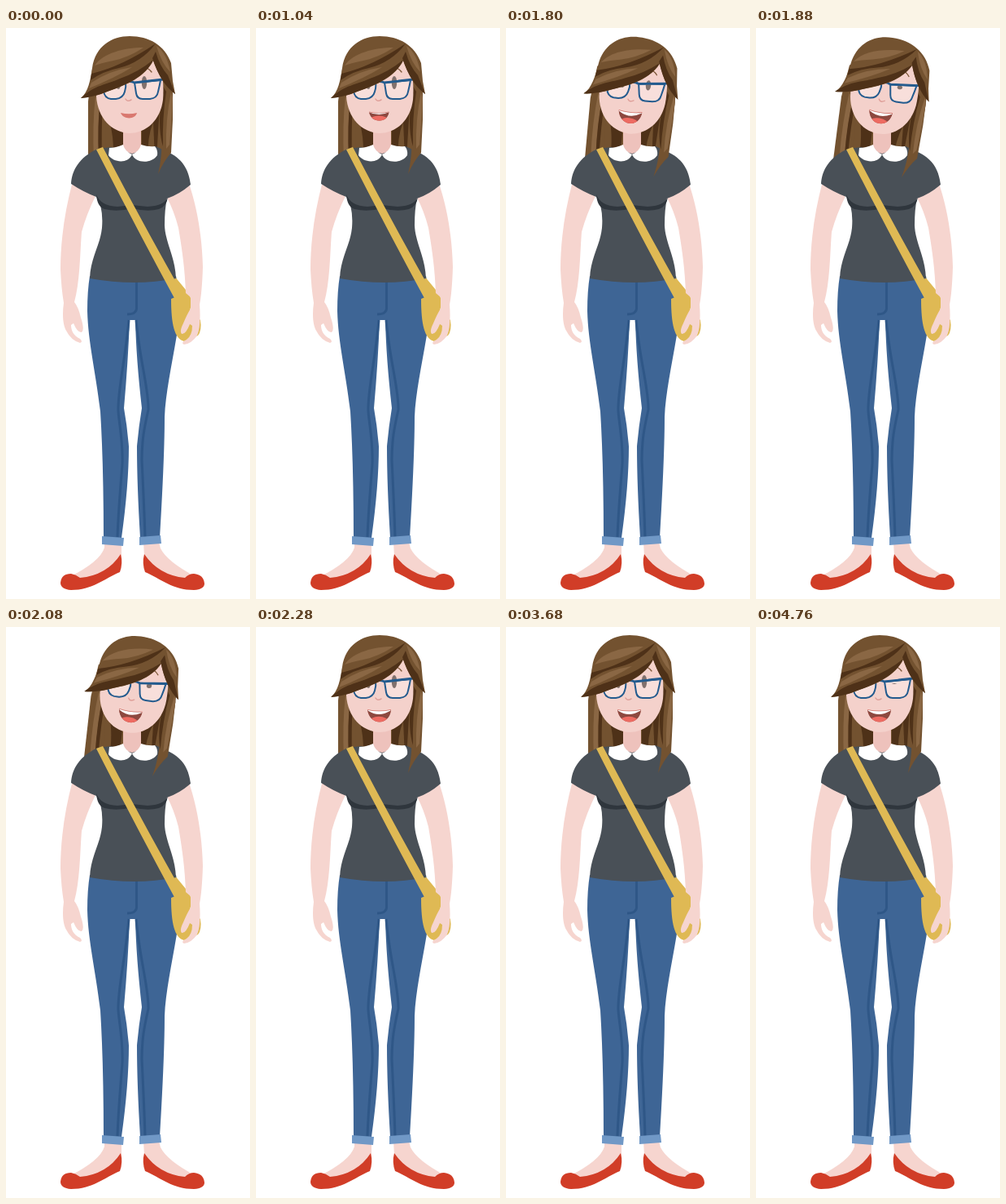
Recreate the animation shown at these times as an HTML page. Size 300 px wide and 700 px high, loop 4.8 s.

```html
<!DOCTYPE html>
<html lang="en">
<head>
<meta charset="utf-8">
<title>Smiling woman</title>
<style>
html, body { margin: 0; width: 100%; height: 100%; overflow: hidden; background: #fff; }
svg { display: block; width: 100%; height: 100%; }
.skin { fill: #f6d5cf; } .face { fill: #f4d1cb; } .neck { fill: #eec2bc; }
.shirt { fill: #495057; } .shade { fill: #2f363d; }
.jeans { fill: #3e6595; } .seam { fill: none; stroke: #2f5787; stroke-width: 3; }
.cuff { fill: #7098c6; } .shoe { fill: #d13d27; } .bag { fill: #dfb954; }
.hair { fill: #735230; } .dark { fill: #4e3118; } .light { fill: #8a6744; }
.frame { fill: #f8dfdb; stroke: #235b8e; stroke-width: 2; }
.line { fill: none; stroke-linecap: round; }
</style>
</head>
<body>
<svg viewBox="0 0 300 700">
  <g class="swing">
    <path class="hair" d="M106 50L198 50 205 85 204 120 201 168 101 168 101 90Z"/>
    <path class="dark" d="M118 80L190 80 185 160 167 160 167 126 144 126 144 160 130 160 124 118Z"/>
    <path class="light" d="M110 84Q106 118 108 162L114 162Q113 120 115 90Z"/>
    <path class="dark" d="M116 88Q112 118 114 160L118 160Q117 122 119 94Z"/>
    <path class="hair" d="M122 100Q133 125 132 158L123 158Z"/>
    <path class="hair" d="M181 115Q173 135 175 160L183 160Z"/>
  </g>

  <!-- legs and feet -->
  <path class="skin" d="M121 630H142V650Q125 672 96 677L78 673Q116 654 121 637Z"/>
  <path class="skin" d="M169 630H188L190 638Q198 654 232 672L215 677Q186 672 170 648Z"/>
  <path class="shoe" d="M67 680Q68 669 80 669Q86 670 91 674Q124 671 141 645Q144 656 140 667C121 675 106 689 80 689Q67 688 67 680Z"/>
  <path class="shoe" d="M244 681Q243 670 231 669Q225 669 220 674Q188 671 170 645Q167 656 171 667C190 675 205 689 231 689Q244 688 244 681Z"/>
  <path class="jeans" d="M103 304H209Q217 342 209 382C204 412 196 449 195 477Q195 525 189 625H165Q161 560 161 513Q163 490 167 466Q160 405 159 358H152Q150 410 145 466Q149 488 151 513Q151 560 142 625H120Q120 535 116 470C110 420 101 385 100 347Q100 322 103 304Z"/>
  <path class="seam" d="M151 358C147 405 137 445 138 470C140 492 144 508 143 535Q138 595 137 624M160 358C164 405 176 445 175 468C170 490 167 505 167 530Q170 590 171 624M160.500 311V344Q160 351 149 351"/>
  <path class="cuff" d="M118 623L145 625 144 635 118 633ZM164 624L190 622 191 632 164 634Z"/>

  <!-- arms and torso -->
  <path class="bag" d="M207 304L226 327Q229 337 226 347L239 358Q241 371 236 377L219 384C207 381 203 363 203 332L208 330Z"/>
  <path class="skin" d="M82 188C72 225 67 262 67 296Q68 319 71 337C69 351 70 364 74 371Q80 383 91 386Q95 385 91 381C83 377 80 371 80 364L83 362Q88 374 93 373Q97 370 92 355Q89 342 84 336C91 311 91 276 93 250Q99 228 111 204Z"/>
  <path class="skin" d="M224 188C236 222 241 258 242 293Q241 324 238 339Q240 365 235 377Q228 387 219 388Q214 386 222 382Q229 377 229 365L226 363Q221 376 216 375Q213 372 218 362Q223 350 227 344V330L221 325C220 292 215 263 212 245Q207 225 197 206Z"/>
  <path class="neck" d="M144 118H166V143Q172 149 180 147L155 157 130 147Q144 149 144 143Z"/>
  <path class="shirt" d="M113 148L129 146 155 154 184 145 201 153C219 162 225 176 227 192Q213 204 198 209Q195 222 195 242C196 264 208 280 209 307Q159 317 103 307C104 281 116 266 118 245Q120 220 111 207Q95 201 80 191C81 175 89 159 113 148Z"/>
  <path class="shade" d="M111 204Q116 218 137 219L155 217 174 219Q194 218 199 208Q197 219 188 222Q174 226 155 221Q137 226 121 222Q112 219 111 204Z"/>
  <path fill="#fff" d="M127 147Q135 147 144 143Q146 151 155 155Q164 151 166 143Q175 146 183 145Q187 150 186 156C179 167 159 166 155 155C150 167 132 165 126 156Z"/>
  <path class="bag" d="M111 149L119 146Q165 234 215 322L208 333Q159 243 111 149Z"/>

  <g class="swing">
    <path class="hair" d="M187 58L205 72 205 112 203 153Q194 163 187 179C194 151 191 126 192 83Z"/>
    <path class="dark" d="M192 70L197 78Q192 110 193 145Q187 126 190 95Z"/>
    <path class="light" d="M203 78Q196 112 197 148L201 143Q204 110 205 86Z"/>
  </g>

  <g id="head">
    <path class="face" d="M111 50L150 30H188Q195 65 193 88C190 113 172 129 152 129C130 128 113 111 111 84Z"/>
    <path class="line" d="M167 49Q174 47 179 54" stroke="#7c5738" stroke-width="1.300"/>
    <path class="line" d="M147 87Q149 91 154 88" stroke="#dfa09a" stroke-width="1.500"/>
    <path class="frame" d="M118 72L147 67Q148 72 146 78Q144 86 135 87H129Q121 86 120 77ZM158 67L190 64Q189 70 187 78Q186 86 177 87H168Q161 87 160 80Z"/>
    <g fill="#81716d">
      <ellipse class="eye" cx="138.200" cy="67" rx="3.200"/>
      <ellipse class="eye" cx="170" cy="67" rx="3.200"/>
    </g>
    <path class="line" d="M120 71L146 67Q152 64 158 67L193 63" stroke="#235b8e" stroke-width="2.800"/>

    <clipPath id="lips"><path id="lipShape"/></clipPath>
    <path id="mouth" fill="#d9786f"/>
    <g id="inside" clip-path="url(#lips)">
      <path fill="#8d4940" d="M136 98H168V118H136Z"/>
      <ellipse id="tongue" fill="#ed6b62" cx="151" rx="12" ry="6.500"/>
      <path id="teeth" fill="#fff"/>
    </g>

    <path class="hair" d="M92 86C101 79 104 63 106 49C110 22 130 10 152 10C176 10 195 21 203 43L205 65 208 81Q191 68 181 40C171 60 148 70 127 77Q108 85 92 86Z"/>
    <path class="dark" d="M92 86C108 70 125 69 140 62Q163 54 181 39C172 59 149 69 127 77Q108 85 92 86Z"/>
    <path class="dark" d="M105 56Q143 47 184 19Q167 42 139 49Q119 53 104 64Z"/>
    <path class="light" d="M109 46C119 31 145 24 169 24Q151 36 132 40Q117 43 109 46Z"/>
    <path class="light" d="M105 67Q127 52 155 48Q134 61 102 74Z"/>
    <path class="dark" d="M180 37L184 29Q189 47 199 58L208 81Q190 68 180 37Z"/>
    <path class="light" d="M185 22Q198 31 202 54Q191 43 185 22Z"/>
  </g>
</svg>
<script>
const LOOP = 4800, STEP = 40;
const $ = id => document.getElementById(id);
const all = name => document.querySelectorAll("." + name);
const clamp = v => Math.max(0, Math.min(1, v));
const mix = (a, b, k) => a + (b - a) * k;

// Eyelids close in four steps, rest, then open in three.
const blink = (t, start) =>
  Math.min(clamp((t - start + STEP) / 160), 1 - clamp((t - start - 240) / 120));

function mouthPath(k) {
  const l = mix(141, 137, k), r = mix(161, 166, k), y = mix(104, 101, k);
  const sag = mix(106.5, 104, k), low = mix(112.5, 120.5, k);
  return `M${l} ${y}Q151 ${sag} ${r} ${y}C${r - 2} ${low} ${l + 3} ${low} ${l} ${y}Z`;
}

function draw(t) {
  const turn = clamp((t - 1640) / 640);
  const tilt = 9.6 * Math.sin(Math.PI * turn) ** 1.3;
  $("head").setAttribute("transform", `rotate(${tilt} 147 116)`);
  all("swing").forEach(e => e.setAttribute("transform", `rotate(${tilt * 0.85} 147 118)`));

  const shut = Math.max(...[120, 1800, 3320, 4640].map(s => blink(t, s)));
  const ry = mix(8, 0.4, shut);
  all("eye").forEach(e => {
    e.setAttribute("ry", ry);
    e.setAttribute("cy", mix(67, 69.5, shut));
  });

  const p = clamp((t - 840) / 400), open = p * p * (3 - 2 * p);
  const shape = mouthPath(open);
  $("mouth").setAttribute("d", shape);
  $("lipShape").setAttribute("d", shape);
  $("inside").setAttribute("transform", `translate(0 ${mix(0.5, 0.8, open)})`);
  $("inside").setAttribute("opacity", clamp(open * 4));
  $("tongue").setAttribute("cy", mix(111, 115.5, open));
  const bite = mix(107, 110.5, open);
  $("teeth").setAttribute("d", `M136 100H167L165 102Q151 ${bite} 138 102Z`);
}

function tick() {
  draw(Math.floor(performance.now() % LOOP / STEP) * STEP);
  requestAnimationFrame(tick);
}
tick();
</script>
</body>
</html>
```
